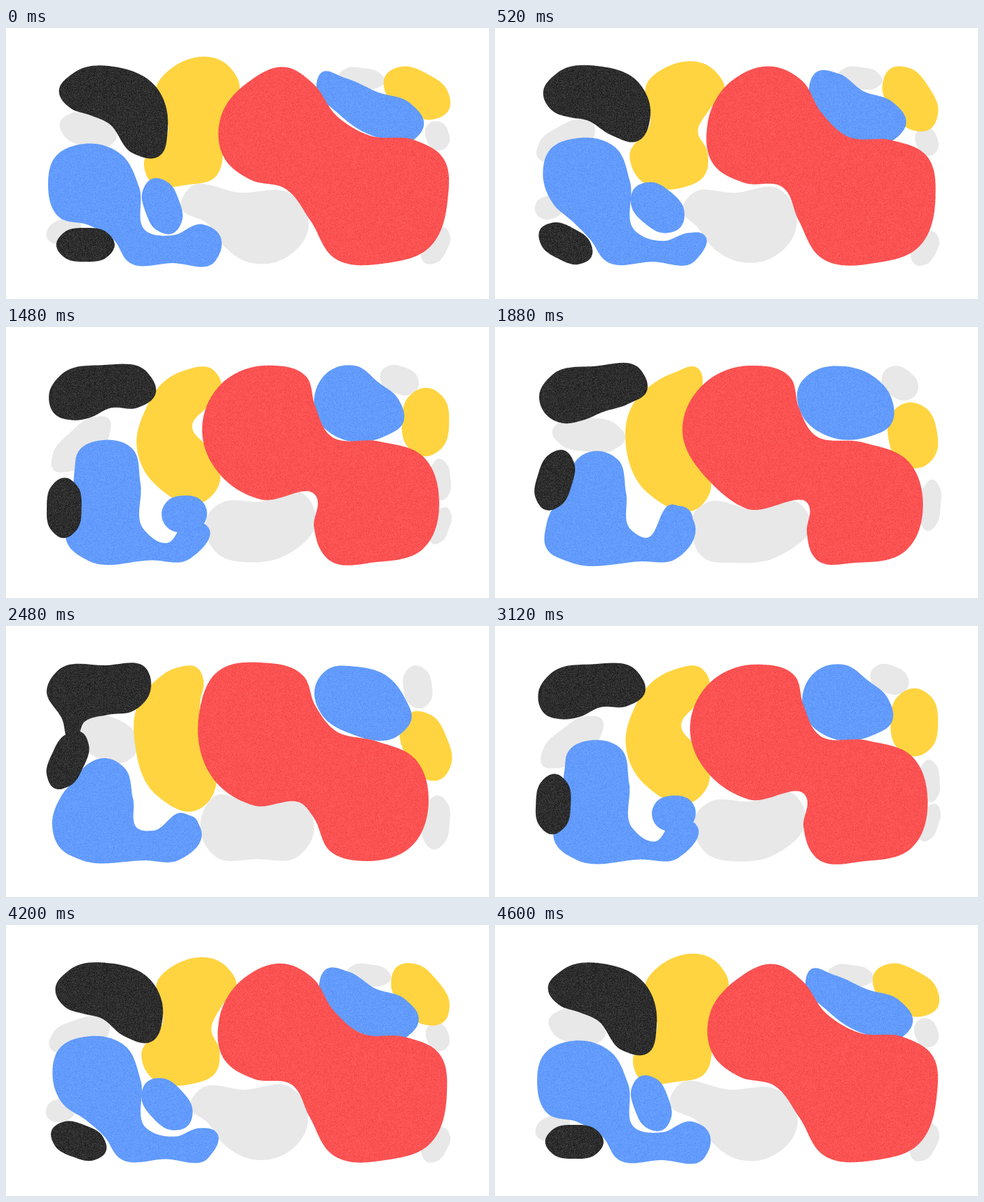
Recreate the animation shown at these times as an HTML page with a canvas. Size 711 px wide and 400 px high, loop 4640 ms.

```html
<!DOCTYPE html>
<html lang="en">
<head>
<meta charset="utf-8">
<title>Blobs</title>
<style>
html, body { margin: 0; width: 100%; height: 100%; overflow: hidden; background: #fff; }
canvas { display: block; width: 711px; height: 400px; }
</style>
</head>
<body>
<canvas id="stage" width="711" height="400"></canvas>
<script>
const W = 711, H = 400, LOOP = 4640, STEP = 40;
const ctx = document.getElementById('stage').getContext('2d');

// The motion runs forward for half the loop, then back again.
const TIMES = [-1040, 0, 1040, 1880, 2160, 2480, 2760];
const ORDER = [1, 0, 1, 2, 3, 3, 2];

let seed = 7;
function rnd() {
  seed = (seed * 1664525 + 1013904223) % 4294967296;
  return seed / 4294967296;
}

// A flat colour with fine, still grain.
function grain(rgb, amp) {
  const c = document.createElement('canvas');
  c.width = W;
  c.height = H;
  const g = c.getContext('2d');
  const img = g.createImageData(W, H);
  for (let i = 0; i < img.data.length; i += 4) {
    const n = (rnd() + rnd() - 1) * amp;
    for (let j = 0; j < 3; j++) img.data[i + j] = rgb[j] + n;
    img.data[i + 3] = 255;
  }
  g.putImageData(img, 0, 0);
  return ctx.createPattern(c, 'repeat');
}

const GRAY = '#e8e8e8';
const YELLOW = '#ffd440';
const BLUE = grain([98, 155, 253], 14);
const BLACK = grain([45, 45, 45], 26);
const RED = grain([252, 82, 82], 16);

const shapes = [];
// Poses of a blob are rings of x, y pairs, clockwise.
const blob = (fill, ...poses) => shapes.push({ fill, poses, ring: p => p });
// Poses of a pebble are centre, radii and tilt in degrees.
const pebble = (fill, ...poses) => shapes.push({ fill, poses, ring: pebbleRing });

function pebbleRing([cx, cy, rx, ry, tilt]) {
  const a = tilt * Math.PI / 180, ca = Math.cos(a), sa = Math.sin(a);
  const soft = v => Math.sign(v) * Math.abs(v) ** 0.9;
  const ring = [];
  for (let i = 0; i < 8; i++) {
    const x = rx * soft(Math.cos(i * Math.PI / 4));
    const y = ry * soft(Math.sin(i * Math.PI / 4));
    ring.push(cx + x * ca - y * sa, cy + x * sa + y * ca);
  }
  return ring;
}

// left grays
pebble(GRAY, [121, 151, 43, 24, 15], [90, 185, 54, 24, -75], [138, 159, 54, 25, 5], [151, 167, 45, 32, 25]);
pebble(GRAY, [85, 299, 27, 17, -25], [77, 212, 12, 16, 0], [110, 162, 8, 8, 0], [145, 160, 8, 8, 0]);

// centre gray
blob(GRAY,
  [268,238, 345,243, 420,246, 445,283, 410,340, 358,346, 319,320, 298,290, 257,262],
  [315,257, 368,247, 425,234, 446,275, 410,336, 370,346, 318,329, 297,300, 299,274],
  [312,259, 375,268, 450,262, 464,283, 418,338, 355,348, 304,338, 290,305, 296,270],
  [306,252, 365,264, 438,264, 452,286, 430,340, 370,344, 308,340, 287,305, 292,270]);

// right grays
pebble(GRAY, [524, 74, 34, 15, 8], [561, 75, 31, 18, 12], [596, 83, 29, 22, 38], [606, 90, 32, 21, 82]);
pebble(GRAY, [635, 159, 22, 17, 70], [637, 190, 24, 15, 75], [641, 263, 38, 15, 95], [633, 290, 40, 20, 95]);
pebble(GRAY, [632, 321, 30, 18, 118], [635, 322, 26, 16, 118], [641, 268, 33, 13, 100], [633, 290, 38, 19, 95]);

// yellows
blob(YELLOW,
  [240,62, 333,62, 344,88, 322,118, 314,160, 319,190, 308,220, 270,231, 212,226, 203,201, 238,155, 223,82],
  [255,61, 311,66, 327,90, 304,123, 278,145, 303,174, 310,218, 285,245, 212,220, 192,172, 213,124, 228,78],
  [262,68, 300,62, 306,81, 290,110, 276,148, 298,191, 318,238, 302,265, 226,246, 193,178, 200,120, 238,80],
  [250,62, 283,63, 291,82, 286,110, 286,150, 298,192, 309,236, 283,271, 222,250, 190,175, 192,122, 222,79]);
pebble(YELLOW, [605, 96, 53, 32, 28], [619, 122, 53, 33, 93], [615, 160, 49, 36, 80], [618, 177, 54, 33, 68]);

// blues
blob(BLUE,
  [72,191, 115,171, 170,187, 196,235, 208,301, 245,306, 290,290, 314,305, 308,344, 245,347, 180,345, 159,313, 122,291, 78,279, 62,230],
  [92,175, 140,155, 186,167, 201,220, 206,300, 250,323, 275,311, 295,300, 275,343, 215,343, 135,342, 112,316, 100,280, 97,238, 86,199],
  [118,199, 148,183, 180,195, 193,245, 200,299, 220,311, 262,262, 292,285, 265,343, 215,346, 110,347, 76,327, 76,290, 95,250, 112,225],
  [120,204, 146,195, 174,209, 187,255, 196,300, 217,302, 260,276, 287,300, 253,346, 205,346, 110,345, 80,328, 68,292, 82,250, 102,226]);
pebble(BLUE, [230, 263, 43, 26, 70], [254, 270, 43, 33, 0], [268, 284, 23, 20, 0], [264, 297, 20, 18, 0]);
blob(BLUE,
  [463,67, 500,74, 548,95, 595,111, 615,144, 600,165, 545,161, 490,127, 457,84],
  [484,63, 515,59, 537,88, 573,106, 591,138, 572,161, 500,166, 470,140, 466,95],
  [468,66, 515,58, 560,75, 584,106, 584,142, 550,162, 490,161, 452,130, 448,86],
  [475,63, 515,60, 558,72, 588,108, 597,137, 580,160, 505,158, 465,131, 455,90]);

// blacks
blob(BLACK,
  [78,94, 100,66, 165,58, 220,86, 238,150, 224,190, 187,185, 150,140, 122,128, 96,119],
  [62,98, 80,68, 140,55, 203,73, 217,107, 195,132, 150,122, 118,132, 98,138, 72,128],
  [65,103, 85,70, 145,58, 215,64, 224,93, 195,114, 160,125, 128,138, 100,142, 76,130],
  [60,94, 76,66, 145,58, 208,65, 213,94, 188,125, 150,131, 116,141, 99,172, 82,136]);
pebble(BLACK, [117, 320, 43, 25, 0], [87, 303, 43, 25, 70], [88, 226, 46, 26, 107], [91, 198, 46, 25, 115]);

// red
blob(RED,
  [413,58, 452,82, 487,130, 536,159, 600,165, 642,190, 650,255, 622,325, 560,347, 484,340, 448,284, 411,237, 360,224, 322,193, 316,132, 355,81],
  [402,56, 450,73, 466,115, 492,161, 560,167, 622,186, 644,248, 620,325, 560,346, 475,339, 447,285, 444,238, 375,239, 322,216, 304,155, 337,74],
  [375,57, 435,75, 447,118, 470,159, 540,170, 610,200, 630,263, 606,329, 530,348, 473,343, 459,302, 463,266, 370,268, 322,234, 276,146, 312,80],
  [375,54, 438,74, 455,117, 484,154, 545,170, 602,196, 622,262, 598,324, 530,347, 478,333, 453,283, 438,264, 365,265, 322,243, 285,125, 312,67]);

// Smooth cubic blend between neighbouring poses.
function poseAt(poses, t) {
  let k = 1;
  while (t >= TIMES[k + 1]) k++;
  const [a, b, c, d] = [k - 1, k, k + 1, k + 2].map(i => poses[ORDER[i]]);
  const [ta, tb, tc, td] = TIMES.slice(k - 1, k + 3);
  const h = tc - tb, s = (t - tb) / h;
  const end = s * s * (3 - 2 * s);
  const out = s * (1 - s) * (1 - s) * h / (tc - ta);
  const into = s * s * (s - 1) * h / (td - tb);
  return b.map((v, i) => v + (c[i] - v) * end + (c[i] - a[i]) * out + (d[i] - v) * into);
}

// Closed curve through the points; each span is close to a circular arc.
function trace(p) {
  const n = p.length / 2;
  const pts = Array.from({ length: n }, (_, i) => [p[2 * i], p[2 * i + 1]]);
  const span = pts.map((q, i) => {
    const r = pts[(i + 1) % n];
    const x = r[0] - q[0], y = r[1] - q[1], len = Math.hypot(x, y) || 0.01;
    return { x: x / len, y: y / len, len };
  });
  const dir = pts.map((_, i) => {
    const u = span[(i + n - 1) % n], v = span[i];
    const x = u.x * v.len + v.x * u.len, y = u.y * v.len + v.y * u.len;
    const len = Math.hypot(x, y) || 1;
    return [x / len, y / len];
  });
  ctx.beginPath();
  ctx.moveTo(...pts[0]);
  for (let i = 0; i < n; i++) {
    const j = (i + 1) % n;
    const [q, r, u, v] = [pts[i], pts[j], dir[i], dir[j]];
    const dot = u[0] * v[0] + u[1] * v[1];
    const k = span[i].len * 2 / 3 / (1 + Math.sqrt(Math.max(0, (1 + dot) / 2)));
    ctx.bezierCurveTo(q[0] + u[0] * k, q[1] + u[1] * k, r[0] - v[0] * k, r[1] - v[1] * k, r[0], r[1]);
  }
  ctx.closePath();
}

function draw(now) {
  const t = Math.floor((now % LOOP) / STEP) * STEP;
  const u = Math.min(t, LOOP - t);
  ctx.fillStyle = '#fff';
  ctx.fillRect(0, 0, W, H);
  for (const { fill, poses, ring } of shapes) {
    trace(ring(poseAt(poses, u)));
    ctx.fillStyle = fill;
    ctx.fill();
  }
}

const start = performance.now();
function tick() {
  draw(performance.now() - start);
  requestAnimationFrame(tick);
}
tick();
</script>
</body>
</html>
```
